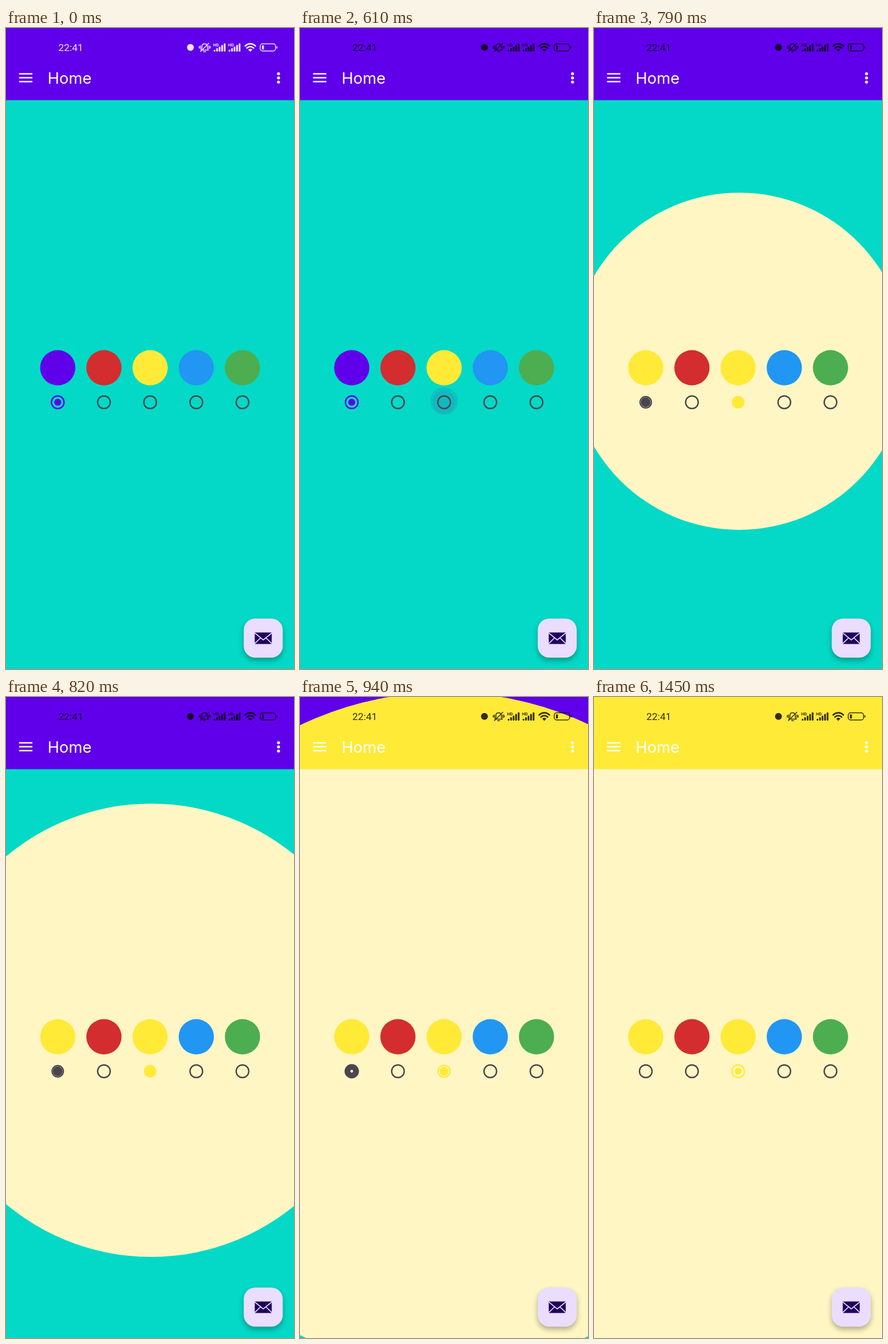
Animation, 502 px wide and 1115 px high, one loop 1.48 s. Source, as an HTML page with a canvas:

```html
<!DOCTYPE html>
<html lang="en">
<head>
<meta charset="utf-8">
<style>
  html, body { margin: 0; width: 100%; height: 100%; overflow: hidden; }
  canvas { display: block; }
</style>
</head>
<body>
<canvas id="stage" width="502" height="1115"></canvas>
<script>
const ctx = document.getElementById('stage').getContext('2d');
const LOOP = 1480, SWITCH = 648, TAU = Math.PI * 2;
const BAR = 125.5, RADIO_Y = 651, UNIT = 1.22;
const DARK = '#49454f', YELLOW = '#ffea38', LILAC = '#eaddff';
const SWATCHES = ['#d32d2f', YELLOW, '#2196f3', '#4cae50'];
const OLD = { primary: '#6000ea', back: '#03d9c6', selected: 0 };
const NEW = { primary: YELLOW, back: '#fff6c4', selected: 2 };

const clamp = v => Math.min(1, Math.max(0, v));
const lerp = (a, b, k) => a + (b - a) * k;
const radioX = i => 90.2 + 80.5 * i;

// cubic-bezier(.4, 0, .2, 1)
function ease(x) {
  x = clamp(x);
  let lo = 0, hi = 1, s;
  for (let i = 0; i < 20; i++) {
    s = (lo + hi) / 2;
    const at = 1.2 * s * (1 - s) ** 2 + 0.6 * s * s * (1 - s) + s ** 3;
    if (at < x) lo = s; else hi = s;
  }
  return 3 * s * s * (1 - s) + s ** 3;
}

function disc(x, y, r, color) {
  ctx.fillStyle = color;
  ctx.beginPath();
  ctx.arc(x, y, r, 0, TAU);
  ctx.fill();
}

function rect(x, y, w, h, color, r = 0) {
  ctx.fillStyle = color;
  ctx.beginPath();
  ctx.roundRect(x, y, w, h, r);
  ctx.fill();
}

function stroke(path, color, width) {
  ctx.strokeStyle = color;
  ctx.lineWidth = width;
  ctx.stroke(new Path2D(path));
}

function text(str, x, y, font, color) {
  ctx.font = font;
  ctx.fillStyle = color;
  ctx.fillText(str, x, y);
}

// Ring and dot of a radio button, `ms` after it was switched on or off
function radio(x, on, ms, color) {
  let scale, width, dot;
  if (on) {
    const fill = ease(ms / 166), settle = ease((ms - 183) / 316);
    const filling = ms < 175;
    scale = filling ? lerp(1, 0.5, fill) : lerp(0.9, 1, settle);
    width = filling ? lerp(2, 18, fill) : 2;
    dot = filling ? 0 : lerp(1.5, 1, settle);
  } else {
    const grow = ease(ms / 183), open = ease((ms - 199) / 316);
    const growing = ms < 191;
    scale = growing ? lerp(1, 0.9, grow) : lerp(0.5, 1, open);
    width = growing ? 2 : lerp(18, 2, open);
    dot = growing ? lerp(1, 1.4, grow) : 0;
  }
  ctx.strokeStyle = color;
  ctx.lineWidth = width * scale * UNIT;
  ctx.beginPath();
  ctx.arc(x, RADIO_Y, 9 * scale * UNIT, 0, TAU);
  ctx.stroke();
  if (dot) disc(x, RADIO_Y, 5 * dot * UNIT, color);
}

function page(theme, t) {
  rect(0, 0, 502, 1115, theme.back);
  rect(0, 0, 502, BAR, theme.primary);
  if (theme === OLD) {
    const press = ease((t - 510) / 90);
    disc(radioX(2), 649, 24 * press, `rgba(73,69,160,${0.14 * press})`);
    disc(radioX(2), RADIO_Y, 20 * press, `rgba(73,69,160,${0.08 * press})`);
  }
  [theme.primary, ...SWATCHES].forEach((color, i) => {
    const on = i === theme.selected;
    const moving = theme === NEW && (on || i === OLD.selected);
    disc(radioX(i), 591, 30.7, color);
    radio(radioX(i), on, moving ? t - SWITCH : 1000, on ? theme.primary : DARK);
  });
}

function toolbar() {
  for (const y of [79.7, 86.5, 93.3]) rect(22.7, y - 1.2, 23.3, 2.4, '#fff');
  for (const y of [79.6, 86.8, 94]) disc(475, y, 2.6, '#fff');
  text('Home', 72.5, 97, '27.4px Inter, sans-serif', '#fff');
}

function statusBar(t) {
  const k = clamp((t - 520) / 90), v = Math.round(255 * (1 - k));
  const color = `rgba(${v},${v},${v},${lerp(0.9, 0.8, k)})`;
  ctx.lineCap = 'round';
  text('22:41', 91.2, 40.4, '17.4px Roboto, sans-serif', color);
  disc(321.5, 33.8, 6, color);
  stroke('M340 38.5H352.5L351 35.5V32Q351 27.5 346 27.5Q341.5 27.5 341.5 32V35.5ZM344.5 41.3H348M339 41L353.5 26.5' +
    'M339 31V36M336.8 32V35M353.7 31V36M355.9 32V35', color, 1.5);
  for (const x of [361, 387]) {
    text('HD', x, 31.8, 'bold 7.4px Roboto, sans-serif', color);
    for (let i = 0; i < 5; i++) {
      const h = 3 + 2.8 * i;
      rect(x + 1 + 4.4 * i, 41 - h, 3, h, color, 1);
    }
  }
  stroke('M416.8 31.2Q425.8 23.5 434.8 31.2M420 34.8Q425.8 29.8 431.6 34.8', color, 2.6);
  ctx.fillStyle = color;
  ctx.fill(new Path2D('M422 37.6Q425.8 34.8 429.6 37.6L425.8 41.4Z'));
  ctx.strokeStyle = color;
  ctx.lineWidth = 1.5;
  ctx.beginPath();
  ctx.roundRect(443.2, 27.6, 26.6, 12.4, 4);
  ctx.stroke();
  rect(446, 30.2, 3.6, 7.2, color, 1);
  rect(471.4, 31.8, 1.7, 4, color, 0.8);
}

function mailButton() {
  ctx.save();
  ctx.shadowColor = 'rgba(0,0,0,.3)';
  ctx.shadowBlur = 10;
  ctx.shadowOffsetY = 5;
  rect(414.4, 1027.2, 68, 68, LILAC, 20);
  ctx.restore();
  rect(433.6, 1051.6, 29.6, 20, '#21005d', 1);
  ctx.lineCap = 'butt';
  stroke('M433.6 1052.4L448.4 1064.4L463.2 1052.4M433.6 1070.6L443.6 1061M463.2 1070.6L453.2 1061', LILAC, 1.7);
}

function draw(now) {
  const t = now % LOOP;
  page(OLD, t);
  const radius = 633 * ease((t - 645) / 435);
  if (radius > 0.5) {
    ctx.save();
    ctx.beginPath();
    ctx.arc(253, 579.7, radius + (radius > 632 ? 20 : 0), 0, TAU);
    ctx.clip();
    page(NEW, t);
    ctx.restore();
  }
  toolbar();
  statusBar(t);
  mailButton();
  requestAnimationFrame(draw);
}
requestAnimationFrame(draw);
</script>
</body>
</html>
```
